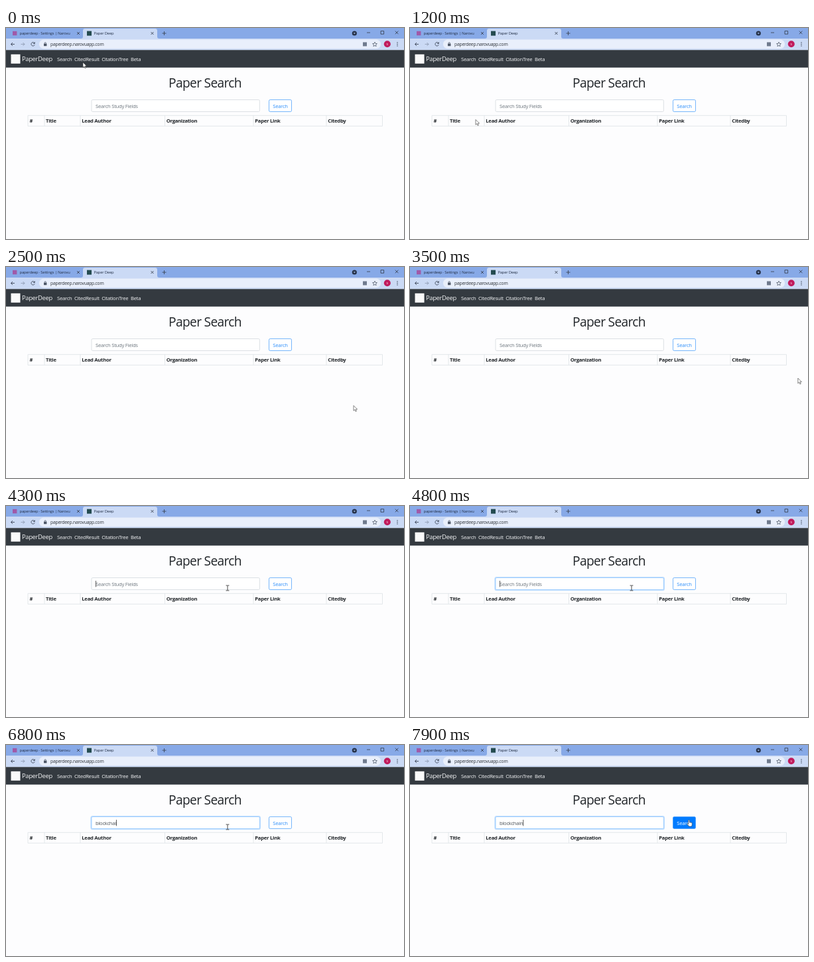
An HTML page that plays this animation: 600 by 319 pixels, repeating every 8000 ms.

```html
<!DOCTYPE html>
<html lang="en">
<head>
<meta charset="utf-8">
<title>Paper Search</title>
<style>
  html, body { margin: 0; width: 100%; height: 100%; overflow: hidden; background: #fdfdfe; }
  svg { display: block; width: 600px; height: 319px; }
  text { font: 7.68px "Open Sans", "Noto Sans", sans-serif; letter-spacing: -.035em; white-space: pre; }
  .tab { font-size: 5.85px; fill: #25324a; }
  .url { font-size: 6.8px; fill: #2b3036; }
  .brand { font-size: 9.4px; }
  .nav text { fill: #f4f5f6; }
  .heading { font-size: 19.2px; font-weight: 500; fill: #212529; }
  .head text { font-weight: 700; fill: #212529; }
  .line { fill: none; stroke: #3c4657; stroke-width: .9; }
</style>
</head>
<body>
<svg viewBox="0 0 600 319">
  <rect width="600" height="319" fill="#fdfdfe"/>

  <!-- Browser window -->
  <rect width="600" height="17" fill="#87a9e7"/>
  <path d="M113 16q3 0 3-3V4q0-3 3-3h106q3 0 3 3v9q0 3 3 3z" fill="#cbdaf5"/>
  <rect y="16" width="600" height="17.5" fill="#cbdaf5"/>
  <rect x="50" y="17.6" width="515" height="13.6" rx="6.8" fill="#e9effb"/>
  <rect x="10" y="4.8" width="6.4" height="6.4" fill="#a05aa8"/>
  <rect x="122" y="4.6" width="7" height="7" fill="#244b50"/>
  <text class="tab" x="20.5" y="10.2">paperdeep · Settings | Narovu</text>
  <text class="tab" x="132.5" y="10.2">Paper Deep</text>
  <text class="url" x="67" y="27">paperdeep.narovuapp.com</text>
  <g class="line">
    <path d="M107 6l4 4m0-4l-4 4M218.5 6l4 4m0-4l-4 4M235.5 8h6m-3-3v6"/>
    <path d="M544 7h5M565 4.6h4.6v4.6h-4.6zM586.8 4.6l4.6 4.6m0-4.6l-4.6 4.6"/>
    <path d="M13 24.5H7.5m2.5-2.5l-2.5 2.5 2.5 2.5"/>
    <path d="M22.5 24.5H28m-2.5-2.5l2.5 2.5-2.5 2.5" stroke="#8e9bb3"/>
    <path d="M43 23a2.7 2.7 0 1 0 .2 2.4M43.3 21.4v2.2h-2.2"/>
    <path d="M58 24v-1a1.2 1.2 0 0 1 2.4 0v1" stroke-width=".7"/>
    <path d="M556 21.3l1 2.2 2.4.2-1.8 1.6.5 2.4-2.1-1.2-2.1 1.2.5-2.4-1.8-1.6 2.4-.2z" stroke-width=".7"/>
  </g>
  <rect x="57" y="23.7" width="4.4" height="3.6" rx=".4" fill="#4b5565"/>
  <rect x="538" y="21.5" width="6" height="6" fill="#707b8e"/>
  <circle cx="525.3" cy="8" r="3.6" fill="#27334a"/>
  <path d="M523.7 7.3h3.2l-1.6 2z" fill="#a9c0eb"/>
  <circle cx="574.8" cy="24.3" r="5" fill="#c01a5c"/>
  <text x="573.5" y="26.2" style="font-size:5px" fill="#fff">s</text>
  <g fill="#3c4657"><circle cx="590" cy="22" r=".75"/><circle cx="590" cy="24.5" r=".75"/><circle cx="590" cy="27" r=".75"/></g>

  <!-- Page -->
  <rect y="33.3" width="600" height="26.5" fill="#343a40"/>
  <rect x="7.5" y="39.8" width="14" height="14" fill="#fafafa"/>
  <g class="nav">
    <text class="brand" x="24" y="50.4">PaperDeep</text>
    <text x="77" y="50">Search</text>
    <text x="103" y="50">CitedResult</text>
    <text x="144.3" y="50">CitationTree</text>
    <text x="188" y="50">Beta</text>
  </g>
  <text class="heading" x="300" y="90" text-anchor="middle">Paper Search</text>

  <rect id="ring" x="128.2" y="107.7" width="255" height="19.6" rx="2.4" fill="none" stroke="#bfdeff" stroke-width="1.6"/>
  <rect id="field" x="129" y="108.5" width="253.4" height="18" rx="1.8" fill="#fff" stroke-width=".7"/>
  <text id="entry" x="135" y="120.6"></text>
  <rect id="caret" y="113" width=".8" height="9.4" fill="#333"/>

  <rect id="button" x="396.5" y="108.5" width="34" height="18" rx="1.8" stroke="#3d98fb" stroke-width=".7"/>
  <text id="label" x="413.5" y="120.6" text-anchor="middle">Search</text>

  <path d="M33 132.3H567.5V148.3H33zM58 132v16M112 132v16M239.5 132v16M373 132v16M483 132v16"
        fill="none" stroke="#dee2e6" stroke-width=".8"/>
  <g class="head">
    <text x="35.5" y="143">#</text>
    <text x="60" y="143">Title</text>
    <text x="114.3" y="143">Lead Author</text>
    <text x="241.7" y="143">Organization</text>
    <text x="375.3" y="143">Paper Link</text>
    <text x="485.3" y="143">Citedby</text>
  </g>

  <!-- Pointers, each drawn around its hot spot -->
  <path id="arrow" d="M0 0v7.8l1.8-1.7 1.3 2.9 1.3-.6-1.3-2.8h2.5z" fill="#fff" stroke="#333" stroke-width=".6"/>
  <path id="beam" d="M-2.4-3.9h1.7l.7.5.7-.5h1.7M0-3.4v6.8M-2.4 3.9h1.7l.7-.5.7.5h1.7" fill="none" stroke="#333" stroke-width=".9"/>
  <path id="hand" d="M-.8 0q.8-1 1.6 0v3.4q.8-.6 1.4.1.8-.5 1.4.2 1-.3 1.1.7v2.1q0 1.2-.8 2.7H0L-2.4 5.8q-.3-1.1.7-.8l.9.9z" fill="#fff" stroke="#333" stroke-width=".6"/>
</svg>
<script>
const LOOP = 8000, STEP = 100, WORD = "blockchain";
const FOCUS = 4290, FIRST_KEY = 5325, KEY_GAP = 167, HOVER = 7500, FADE = 150, BLINK = 530;

// Pointer stops: time, x, y
const PATH = [
  [300, 116, 52], [1100, 99, 138.5], [1250, 99, 138.5], [2050, 524, 209.5],
  [2700, 524, 209.5], [3100, 592, 195], [3600, 584, 165], [4100, 334, 124],
  [7200, 334, 124], [7700, 420.5, 113.8]
];

const $ = id => document.getElementById(id);
const clamp = v => Math.max(0, Math.min(1, v));
const ease = p => p * p * (3 - 2 * p);
const fade = (t, start) => ease(clamp((t - start) / FADE));
const mix = (a, b, p) => `rgb(${a.map((v, i) => Math.round(v + (b[i] - v) * p))})`;
const set = (id, attrs) => { for (const k in attrs) $(id).setAttribute(k, attrs[k]); };
const inside = (x, y, left, right) => x > left && x < right && y > 108 && y < 127;

function pointerAt(t) {
  const next = PATH.findIndex(stop => stop[0] > t);
  if (next === 0) return PATH[0].slice(1);
  if (next < 0) return PATH[PATH.length - 1].slice(1);
  const [t0, x0, y0] = PATH[next - 1], [t1, x1, y1] = PATH[next];
  const p = ease((t - t0) / (t1 - t0));
  return [x0 + (x1 - x0) * p, y0 + (y1 - y0) * p];
}

function drawPointer(t) {
  const [x, y] = pointerAt(t);
  const kind = inside(x, y, 396, 431) ? "hand" : inside(x, y, 129, 382) ? "beam" : "arrow";
  for (const id of ["arrow", "beam", "hand"])
    set(id, { transform: `translate(${x} ${y})`, visibility: id === kind ? "visible" : "hidden" });
}

function drawField(t) {
  const count = Math.max(0, Math.min(WORD.length, Math.floor((t - FIRST_KEY) / KEY_GAP) + 1));
  const focus = fade(t, FOCUS), entry = $("entry");
  entry.textContent = count ? WORD.slice(0, count) : "Search Study Fields";
  set("entry", { fill: count ? "#495057" : "#6c757d" });
  set("ring", { opacity: focus });
  set("field", { stroke: mix([206, 212, 218], [128, 189, 255], focus) });

  const lastKey = count ? FIRST_KEY + (count - 1) * KEY_GAP : FOCUS;
  const shown = t >= FOCUS && Math.floor((t - lastKey) / BLINK) % 2 === 0;
  set("caret", {
    x: 135 + (count ? entry.getComputedTextLength() : 0),
    visibility: shown ? "visible" : "hidden"
  });
}

function drawButton(t) {
  const hover = fade(t, HOVER);
  set("button", { fill: mix([255, 255, 255], [0, 123, 255], hover) });
  set("label", { fill: mix([45, 143, 250], [255, 255, 255], hover) });
}

function render(now) {
  const t = Math.floor(now % LOOP / STEP) * STEP;
  drawField(t);
  drawButton(t);
  drawPointer(t);
}

const start = performance.now();
function tick() {
  render(performance.now() - start);
  requestAnimationFrame(tick);
}
tick();
</script>
</body>
</html>
```
